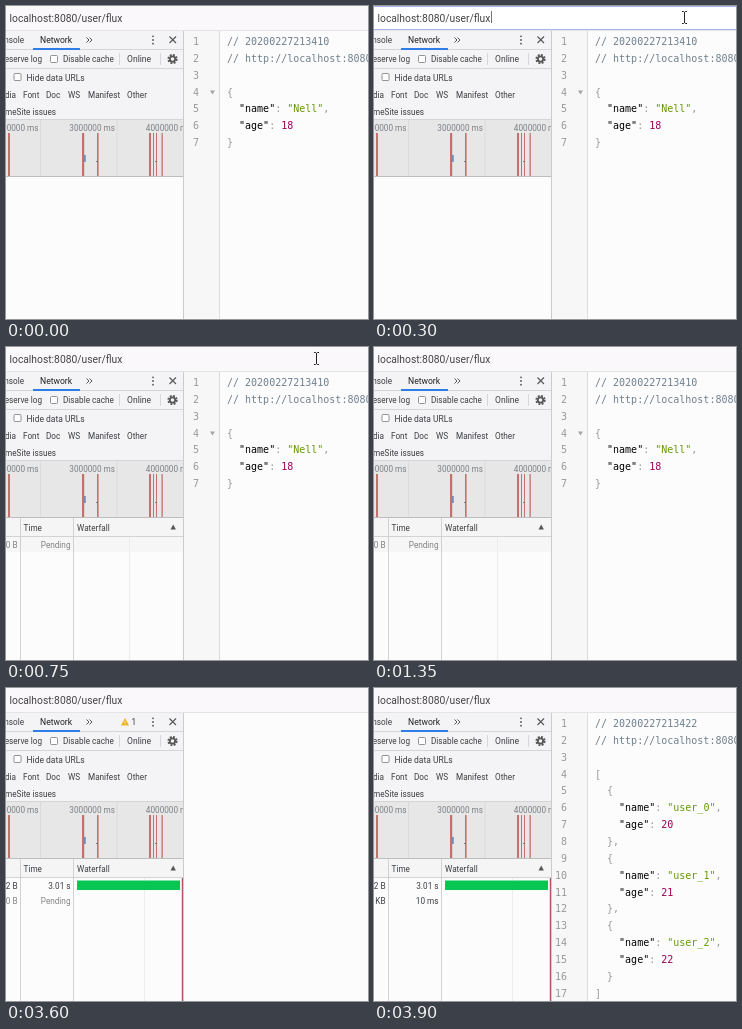
Animation of 362 by 313 pixels, one loop 4.05 s. Source, as an HTML page:

```html
<!DOCTYPE html>
<html lang="en">
<head>
<meta charset="utf-8">
<style>
  html, body { margin: 0; width: 100%; height: 100%; overflow: hidden; background: #fcfcfc; }
  svg { display: block; width: 362px; height: 313px; }
  text { font: 8.2px Roboto, "Open Sans", sans-serif; fill: #3c3f43; white-space: pre; }
  .mono, .mono tspan { font: 10px "DejaVu Sans Mono", "Liberation Mono", monospace; }
</style>
</head>
<body>
<svg id="stage" viewBox="0 0 362 313"></svg>
<script>
const LOOP = 4050;
const stage = document.getElementById('stage');

function add(parent, tag, attrs = {}, content) {
  const el = document.createElementNS('http://www.w3.org/2000/svg', tag);
  for (const key in attrs) el.setAttribute(key, attrs[key]);
  if (content !== undefined) el.textContent = content;
  parent.appendChild(el);
  return el;
}
const group = () => add(stage, 'g');
const rect = (p, x, y, width, height, fill) => add(p, 'rect', { x, y, width, height, fill });
const path = (p, d, stroke, width = 1, fill = 'none') =>
  add(p, 'path', { d, stroke, 'stroke-width': width, fill });

function label(p, x, y, str, { size, color, anchor = 'start' } = {}) {
  const el = add(p, 'text', { x, y, 'text-anchor': anchor }, str);
  if (size) el.style.fontSize = size + 'px';
  if (color) el.style.fill = color;
}

function checkbox(p, x, y) {
  add(p, 'rect', { x, y, width: 7, height: 7, rx: 1, fill: '#fff', stroke: '#888', 'stroke-width': 0.9 });
}

// Code pane
const INK = { comment: '#708090', mark: '#999', key: '#000', text: '#690', number: '#905' };

function codeLine(p, n, parts) {
  const y = 39 + (n - 1) * 16.85;
  const num = add(p, 'text', { class: 'mono', x: 193, y, 'text-anchor': 'end' }, n);
  num.style.fill = '#999';
  const line = add(p, 'text', { class: 'mono', x: 221, y });
  for (const [kind, str] of parts) add(line, 'tspan', {}, str).style.fill = INK[kind];
}

const field = (indent, key, value, comma) => [
  ['key', indent + `"${key}"`], ['mark', ': '],
  [typeof value === 'number' ? 'number' : 'text', JSON.stringify(value)],
  ['mark', comma]
];

function codePane(stamp, body) {
  const g = group();
  rect(g, 178, 25, 35, 288, '#f7f7f7');
  path(g, 'M213.5 25V313', '#ddd');
  const lines = [
    [['comment', '// ' + stamp]],
    [['comment', '// http://localhost:8080/user/flux']],
    [], ...body
  ];
  lines.forEach((parts, i) => codeLine(g, i + 1, parts));
  return g;
}

// Window base
rect(stage, 0, 0, 362, 313, '#fcfcfc');
rect(stage, 0, 0, 362, 24, '#faf8fb');

function panel() {
  const g = group();
  rect(g, 0, 25, 178, 89, '#f4f3f5');
  path(g, 'M0 43.5H178M0 62.5H178M0 113.5H178', '#d2d2d2', 0.9);
  label(g, 18, 37, 'Console', { anchor: 'end' });
  label(g, 34, 37, 'Network', { size: 8.6, color: '#222' });
  rect(g, 27, 42, 47, 2, '#2f7de6');
  path(g, 'M80.5 31.5l2.5 2.5l-2.5 2.5M83.5 31.5l2.5 2.5l-2.5 2.5', '#555');
  for (const y of [30.3, 34, 37.7]) add(g, 'circle', { cx: 147, cy: y, r: 0.9, fill: '#555' });
  path(g, 'M163.5 30.5l6.5 6.5M170 30.5l-6.5 6.5', '#555', 1.1);

  label(g, 36, 56, 'Preserve log', { anchor: 'end' });
  checkbox(g, 44.5, 49.5);
  label(g, 57, 56, 'Disable cache');
  path(g, 'M113.5 47V59M154.5 47V59', '#d0d0d0', 0.8);
  label(g, 121, 56, 'Online', { size: 8.6 });
  add(g, 'circle', { cx: 166.5, cy: 53, r: 4.2, fill: 'none', stroke: '#555',
    'stroke-width': 1.8, 'stroke-dasharray': '1.9 1.4' });
  add(g, 'circle', { cx: 166.5, cy: 53, r: 2.7, fill: 'none', stroke: '#555', 'stroke-width': 1.8 });

  checkbox(g, 8, 67.5);
  label(g, 20.5, 74.5, 'Hide data URLs', { size: 8.5 });
  label(g, 10, 91.5, 'Media', { anchor: 'end' });
  const types = { Font: 17, Doc: 40, WS: 62, Manifest: 82, Other: 121 };
  for (const name in types) label(g, types[name], 91.5, name);
  label(g, 50, 109, 'SameSite issues', { anchor: 'end' });
}

function overview() {
  const g = group();
  rect(g, 0, 114, 178, 56, '#e7e7e7');
  [2, 3, 4].forEach((n, i) => {
    const x = 34.5 + i * 76.5;
    path(g, `M${x} 114V170`, '#d8d8d8', 0.8);
    label(g, x - 2, 125, n + '000000 ms', { anchor: 'end', color: '#7c8085' });
  });
  for (const [x, w] of [[2, 2], [76, 2.2], [91, 1.6], [143, 2], [147, 1], [150, 1], [155.5, 1.3]]) {
    rect(g, x, 127, w, 43, '#c4716b');
  }
  rect(g, 78, 149, 1.8, 7, '#6c8fc4');
  path(g, 'M90 155.5H92M149 155.5H151', '#777');
  path(g, 'M0 170.5H178', '#bdbdbd');
  // Cover the axis label that runs past the pane edge
  rect(g, 178, 25, 184, 288, '#fcfcfc');
}

function tableBase() {
  const g = group();
  rect(g, 0, 171, 178, 18, '#f5f5f5');
  path(g, 'M0 189.5H178M14.5 171V313M67.5 171V313', '#cfcfcf', 0.9);
  label(g, 17.5, 183.5, 'Time');
  label(g, 71, 183.5, 'Waterfall');
  path(g, 'M164.5 182.5h5.4l-2.7-5z', 'none', 0, '#555');
  return g;
}

function row(p, y, size, time, color) {
  label(p, 11.5, y, size, { anchor: 'end', color });
  label(p, 64.5, y, time, { anchor: 'end', color });
}

function rowGroup(...args) {
  const g = group();
  row(g, ...args);
  return g;
}

panel();
overview();

const table = tableBase();
const waiting = rowGroup(200.5, '0 B', 'Pending', '#858585');
rect(waiting, 0, 190, 178, 15, 'rgba(0,0,0,.025)');
path(waiting, 'M123.5 190V313', '#ececec');

const done = group();
path(done, 'M138.5 190V313', '#ececec');
row(done, 200.5, '2 B', '3.01 s');
rect(done, 71, 192.5, 103, 9.5, '#08c654');
rect(done, 175.8, 190, 1.4, 123, '#b4506a');

const second = rowGroup(215.5, '0 B', 'Pending', '#858585');
const loaded = rowGroup(215.5, 'KB', '10 ms');

const warning = group();
path(warning, 'M115 37.5h8l-4-7.4z', 'none', 0, '#f0b11c');
path(warning, 'M119 32.8v2.2M119 35.8v.8', '#fff', 0.8);
label(warning, 125.5, 37, '1');

const before = codePane('20200227213410', [
  [['mark', '{']],
  field('  ', 'name', 'Nell', ','),
  field('  ', 'age', 18, ''),
  [['mark', '}']]
]);
path(before, 'M204 84.5h5l-2.5 4z', 'none', 0, '#a5a5a5');

const users = [0, 1, 2].flatMap(i => [
  [['mark', '  {']],
  field('    ', 'name', 'user_' + i, ','),
  field('    ', 'age', 20 + i, ''),
  [['mark', i < 2 ? '  },' : '  }']]
]);
const after = codePane('20200227213422', [[['mark', '[']], ...users, [['mark', ']']]]);

path(stage, 'M177.5 25V313', '#cbcbcb');
path(stage, 'M0 24.5H362', '#e4e4e4');

const focus = group();
rect(focus, 0, 0, 362, 24, '#fff');
path(focus, 'M0 .5H362M0 23.5H362', '#a9b8ec');
path(focus, 'M117.5 5V17', '#777');
label(stage, 3.5, 15.5, 'localhost:8080/user/flux', { size: 10.3, color: '#444' });

const pointer = group();
path(pointer, 'M308 5.5h1.6l.9 .8l.9 -.8h1.6M310.5 6V17M308 17.5h1.6l.9 -.8l.9 .8h1.6', '#222');

// Visible spans in ms
const spans = [
  [pointer, 150, 1200],
  [focus, 300, 750],
  [table, 750, LOOP],
  [waiting, 750, 3600],
  [before, 0, 3600],
  [done, 3600, LOOP],
  [warning, 3600, 3750],
  [second, 3600, 3900],
  [after, 3750, LOOP],
  [loaded, 3900, LOOP]
];

const start = performance.now();
function draw() {
  const t = (performance.now() - start) % LOOP;
  for (const [el, from, to] of spans) el.style.display = t >= from && t < to ? '' : 'none';
  requestAnimationFrame(draw);
}
draw();
</script>
</body>
</html>
```
